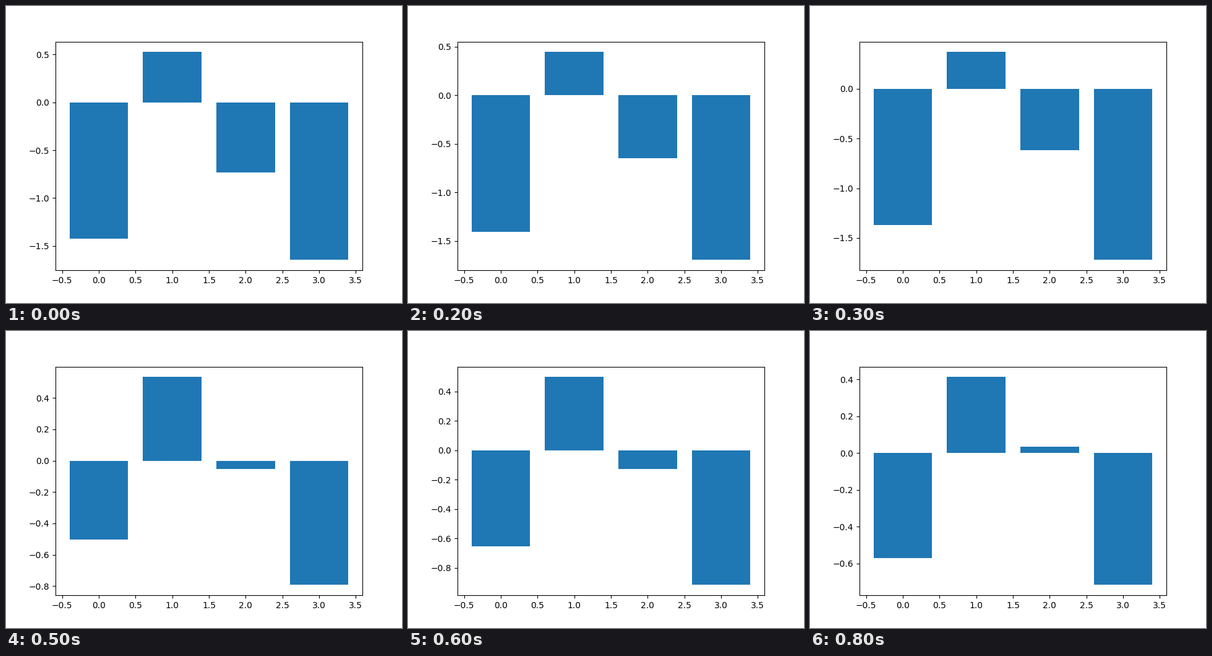
Animation, 640 px wide and 480 px high, one loop 0.9 s. Source, as a matplotlib script:

```python
import matplotlib.pyplot as plt
import numpy as np
from matplotlib.animation import FuncAnimation

STEPS = 9
JUMP = 4  # the bars snap to new heights here
MARGIN = 0.05

# Key poses: step -> bar heights
POSES = {
    0: (-1.423, 0.5243, -0.732, -1.6455),
    1: (-1.434, 0.490, -0.671, -1.682),
    3: (-1.370, 0.371, -0.617, -1.721),
    4: (-0.280, 0.584, 0.051, -0.6125),
    6: (-0.653, 0.499, -0.126, -0.9155),
    8: (-0.5704, 0.4128, 0.0345, -0.7162),
}


def heights(step):
    """Ease between key poses: speeding up before the jump, slowing after."""
    start = max(k for k in POSES if k <= step)
    end = min(k for k in POSES if k >= step)
    a, b = np.array(POSES[start]), np.array(POSES[end])
    u = (step - start) / max(end - start, 1)
    return a + (b - a) * u ** (1.4 if step < JUMP else 0.75)


fig, ax = plt.subplots(figsize=(6.4, 4.8), dpi=100)
bars = ax.bar(range(4), heights(0), color="#1f77b4")
ax.set_xlim(-0.59, 3.59)


def draw(step):
    values = heights(step)
    for bar, value in zip(bars, values):
        bar.set_height(value)
    low, high = values.min(), values.max()
    pad = MARGIN * (high - low)
    ax.set_ylim(low - pad, high + pad)
    return bars


anim = FuncAnimation(fig, draw, frames=STEPS, interval=100,
                     init_func=lambda: draw(0), repeat=True, repeat_delay=0)
plt.show()
```
